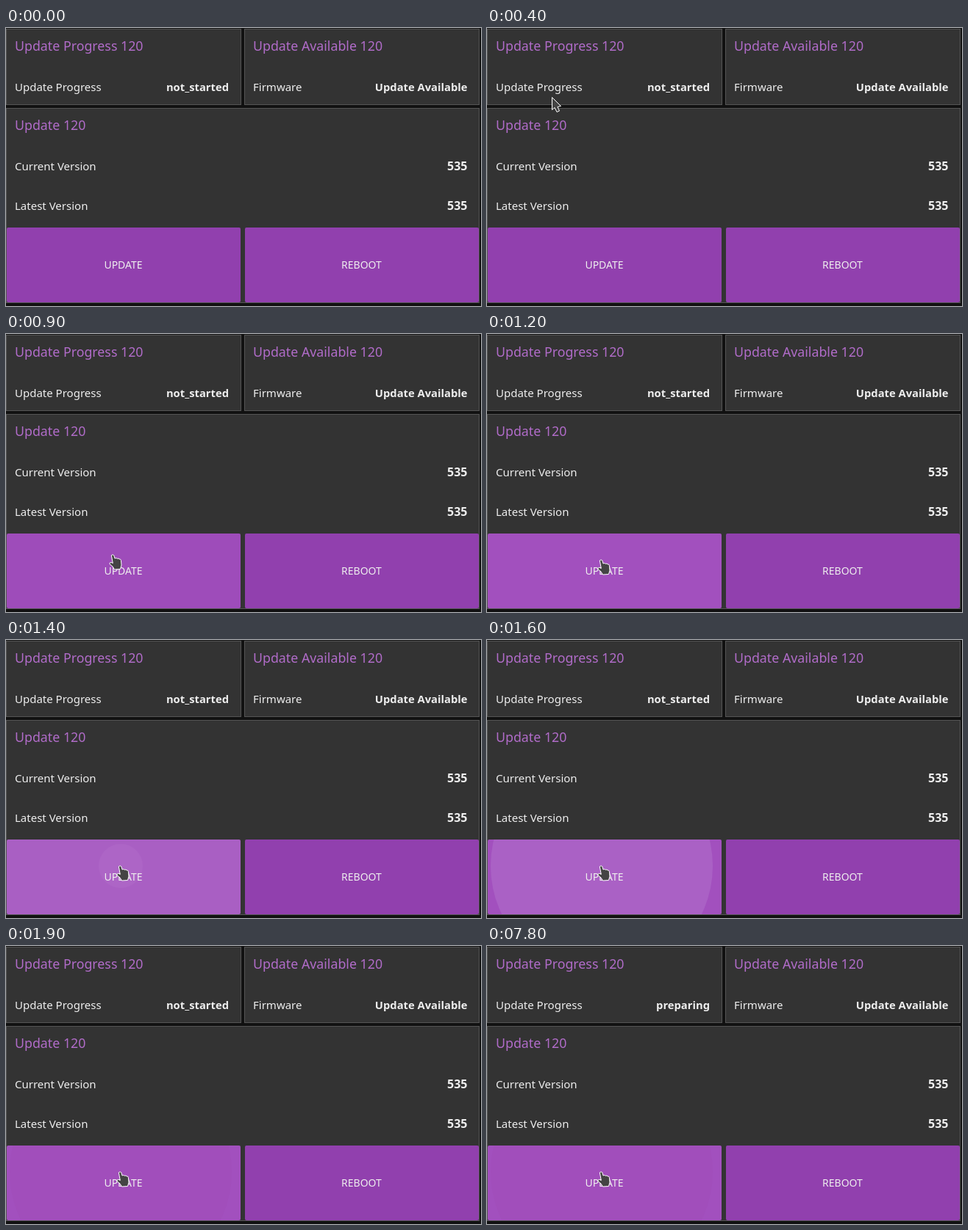
An HTML page for the animation above (8 s loop, 646x379 px).

```html
<!DOCTYPE html>
<html lang="en">
<head>
<meta charset="utf-8">
<title>Firmware update panel</title>
<style>
  html, body { margin: 0; width: 100%; height: 100%; overflow: hidden; background: #111; }
  svg { display: block; width: 646px; height: 379px; font: 15px "Noto Sans", sans-serif; }
  .card { fill: #333; stroke: #555; }
  text { fill: #eee; }
  .title { font-size: 17.8px; fill: #b16cc9; }
  .value { font-size: 14.75px; font-weight: bold; text-anchor: end; }
  .number { font-size: 16px; }
  .label { font-size: 14px; text-anchor: middle; }
  .cursor { fill: #444; stroke: #fff; stroke-linejoin: round; }
</style>
</head>
<body>
<svg viewBox="0 0 646 379">
  <clipPath id="clip"><rect x="1" y="272" width="318" height="102" rx="2"/></clipPath>
  <rect class="card" x=".5" y="1.5" width="319" height="103"/>
  <rect class="card" x="324.5" y="1.5" width="319" height="103"/>
  <rect class="card" x=".5" y="109.5" width="643" height="265"/>

  <text class="title" x="12" y="30.5">Update Progress 120</text>
  <text x="12" y="86">Update Progress</text>
  <text class="value" id="progress" x="303" y="86"></text>

  <text class="title" x="336" y="30.5">Update Available 120</text>
  <text x="336" y="86">Firmware</text>
  <text class="value" x="627.5" y="86">Update Available</text>

  <text class="title" x="12" y="138.5">Update 120</text>
  <text x="12" y="194">Current Version</text>
  <text class="value number" x="627.5" y="194">535</text>
  <text x="12" y="248">Latest Version</text>
  <text class="value number" x="627.5" y="248">535</text>

  <g clip-path="url(#clip)">
    <rect id="button" x="1" y="272" width="318" height="102"/>
    <g id="ripple"></g>
  </g>
  <rect x="325" y="272" width="318" height="102" rx="2" fill="#9140ae"/>
  <text class="label" x="159.5" y="328">UPDATE</text>
  <text class="label" x="483.5" y="328">REBOOT</text>

  <path class="cursor" id="arrow" d="M.5 .5V17.5L4 14.5L7 20.5L10.5 19L8 13.5L12.5 12.5Z"/>
  <path class="cursor" id="hand" d="M-1.7 .8Q.2-1.2 1.8 .8L3 5Q5 3.7 6.3 5.3Q8.2 4.3 9.2 6Q11 5.5 11.4 7.5L12 14L10.5 19.5L2.5 20L0 16L-4 12.7Q-4.5 10.5-2.2 10.3L.3 11.5Z"/>
</svg>
<script>
const LOOP = 8000, BASE = "#9140ae", HOVER = "#a250be", LIGHT = "#aa61c5";
const $ = id => document.getElementById(id);

// Pointer stops: time, x, y
const path = [[300, 84, 23], [400, 88, 94], [500, 101, 173], [600, 115, 231],
  [700, 128, 266], [800, 138, 288], [900, 145, 301], [1000, 148, 307], [1200, 155, 308]];

// Button looks: time, background, then ripple discs as [radius, colour], largest first
const looks = [
  [0, BASE],
  [800, "#9746b4"],
  [900, "#9e4cba"],
  [1000, HOVER],
  [1400, "#a95fc3", [30, "#ad65c6"]],
  [1500, "#a95fc3", [91, "#ad65c6"]],
  [1600, HOVER, [151, LIGHT]],
  [1800, HOVER, [151, LIGHT], [132, "#a14ebb"], [91, LIGHT], [30, "#a14ebb"]],
  [1900, HOVER, [151, "#a14ebb"]]
];

const latest = (list, t) => list.filter(step => step[0] <= t).pop();

function show(id, visible, x, y) {
  $(id).setAttribute("visibility", visible ? "visible" : "hidden");
  if (visible) $(id).setAttribute("transform", `translate(${x} ${y})`);
}

function draw(now) {
  const t = now % LOOP;
  const [, fill, ...discs] = latest(looks, t);
  $("button").setAttribute("fill", fill);
  $("ripple").innerHTML = discs.map(([r, c]) =>
    `<circle cx="156" cy="308" r="${r}" fill="${c}"/>`).join("");

  const [, x, y] = latest(path, t) || [];
  const overButton = y > 272;
  show("arrow", y && !overButton, x, y);
  show("hand", overButton, x, y);

  $("progress").textContent = t < 7800 ? "not_started" : "preparing";
  requestAnimationFrame(draw);
}
requestAnimationFrame(draw);
</script>
</body>
</html>
```
